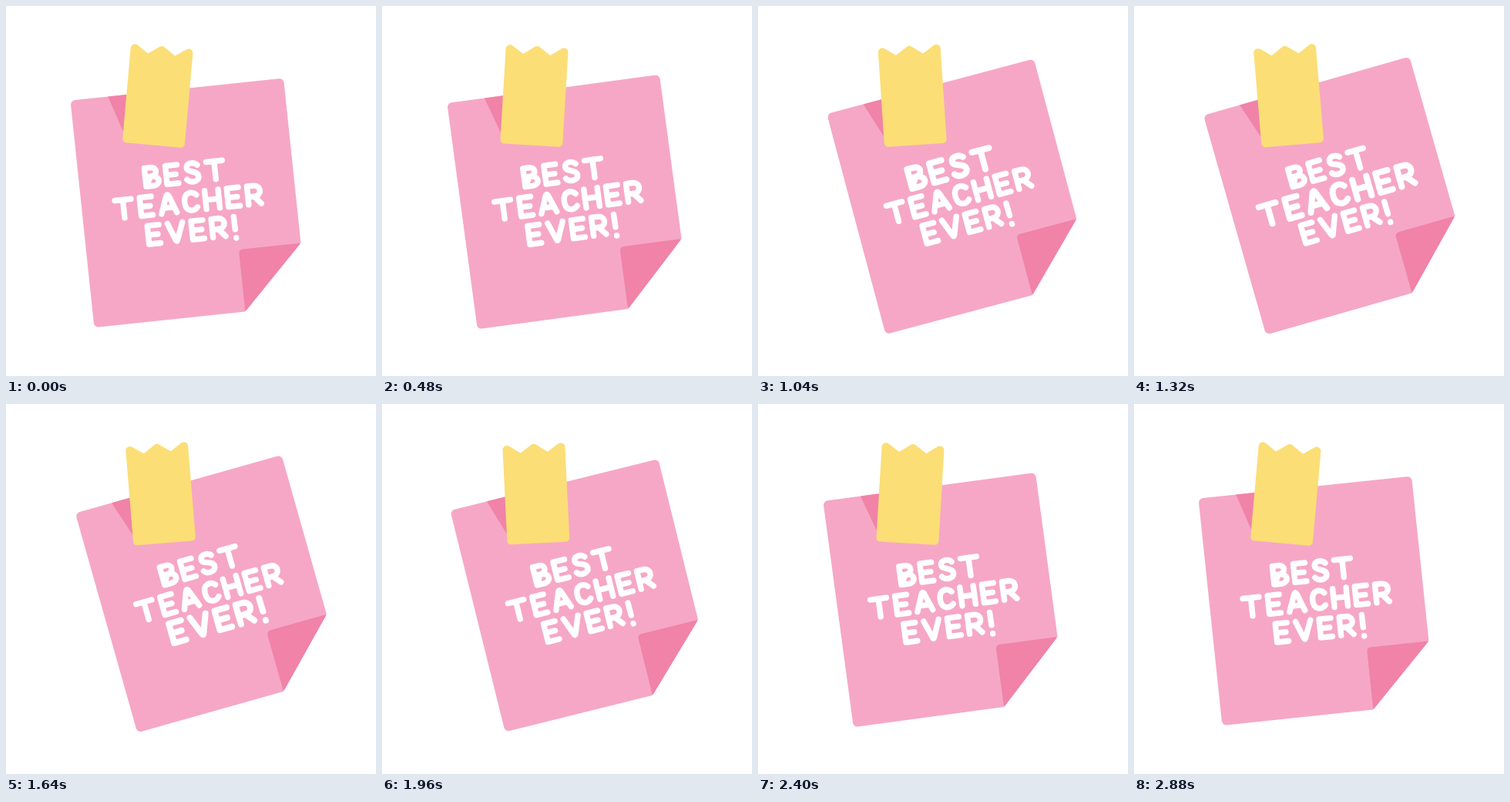
Animation of 480 by 480 pixels, one loop 2920 ms. Source, as an HTML page with a canvas:

```html
<!DOCTYPE html>
<html lang="en">
<head>
<meta charset="utf-8">
<title>Best teacher ever!</title>
<style>
html, body { margin: 0; width: 100%; height: 100%; overflow: hidden; background: #fff; }
canvas { display: block; width: 480px; height: 480px; }
</style>
</head>
<body>
<canvas id="stage" width="480" height="480" role="img" aria-label="BEST TEACHER EVER!"></canvas>
<script>
const ctx = document.getElementById('stage').getContext('2d');

const LOOP = 2920, STEP = 40, SWING = 2880;
const PIVOT = [197.3, 94.8];
const RAD = Math.PI / 180;
const PINK = '#f6a7c6', ROSE = '#f083a7', YELLOW = '#fbde76';
const W = 278, H = 296, FOLD = 81;
const GAP = 11.3, LEADING = 37.4, CAP = 24;
const LINES = ['BEST', 'TEACHER', 'EVER!'];

// Hand lettering: width and stroked path of each letter
const glyph = (width, path) => ({ width, path: new Path2D(path) });
const GLYPHS = {
  A: glyph(20, 'M0 24L8.4 1.6Q10 -1.4 11.6 1.6L20 24M4 16.8H16'),
  B: glyph(16, 'M0 24V0H8C17 0 17 11 7 11.5H2M7 11.5C20 11 20 24 9 24H0Z'),
  C: glyph(16, 'M16 4C11 -2 0 -1 0 12C0 25 11 26 16 20'),
  E: glyph(15, 'M15 0H0V24H15M0 12H12.5'),
  H: glyph(17.5, 'M0 0V24M17.5 0V24M0 12H17.5'),
  R: glyph(16.5, 'M0 24V0H8C19 0 19 14 8 14H2M8 14L16.5 24'),
  S: glyph(15.5, 'M15 3C12 -1 1 -2 1 5.5C1 12 15.5 10 15.5 18C15.5 25 4 26 0 20.5'),
  T: glyph(21, 'M0 .5H21M10.5 .5V24'),
  V: glyph(19.5, 'M0 0L9 23Q9.8 24.6 10.6 23L19.5 0'),
  '!': glyph(3, 'M1.5 0L1.8 16.5M2 27.5V27.8')
};

// Cubic ease (.6, 0, .4, 1), solved by bisection
function ease(x) {
  let lo = 0, hi = 1, s = .5;
  for (let i = 0; i < 24; i++) {
    s = (lo + hi) / 2;
    if (1.8 * s - 2.4 * s * s + 1.6 * s * s * s < x) lo = s; else hi = s;
  }
  return s * s * (3 - 2 * s);
}

function pulse(t, peak) {
  const d = Math.min(1, Math.abs(t - peak) / 280);
  return 1 + .04 * (1 + Math.cos(Math.PI * d));
}

// Runs paint in a frame moved to (x, y) and turned by deg
function at(x, y, deg, paint) {
  ctx.save();
  ctx.translate(x, y);
  ctx.rotate(deg * RAD);
  paint();
  ctx.restore();
}

// Filled polygon of [x, y, radius] corners
function shape(points, color) {
  const a = points[points.length - 1], b = points[0];
  ctx.beginPath();
  ctx.moveTo((a[0] + b[0]) / 2, (a[1] + b[1]) / 2);
  points.forEach(([x, y, r = 0], i) => {
    const next = points[(i + 1) % points.length];
    ctx.arcTo(x, y, next[0], next[1], r);
  });
  ctx.closePath();
  ctx.fillStyle = color;
  ctx.fill();
}

// One line of lettering, centred, popping in its turn
function drawLine(text, i, t) {
  const letters = [...text].map(ch => GLYPHS[ch]);
  const width = letters.reduce((sum, g) => sum + g.width + GAP, -GAP);
  const k = pulse(t, 1040 + 300 * i);
  at(136.9 + 1.2 * i, 109.2 + LEADING * i, 0, () => {
    ctx.scale(k, k);
    ctx.translate(-width / 2, -CAP / 2);
    for (const g of letters) {
      ctx.stroke(g.path);
      ctx.translate(g.width + GAP, 0);
    }
  });
}

function drawNote(t) {
  const x = W - FOLD, y = H - FOLD;
  shape([[0, 0, 6], [W, 0, 6], [W, y, 1], [x, H, 1], [0, H, 6]], PINK);
  shape([[x, y, 5], [W, y, 1], [x, H, 1]], ROSE);
  shape([[49, 0], [100, 0], [85, 50], [65, 50.5]], ROSE);
  ctx.strokeStyle = '#fff';
  ctx.lineWidth = 7.4;
  ctx.lineCap = ctx.lineJoin = 'round';
  LINES.forEach((text, i) => drawLine(text, i, t));
}

function drawTape() {
  const w = 81, h = 131.4, mid = w / 2, notch = 17.6;
  shape([
    [0, -2, 5.5], [mid - notch, 13.6, 1], [mid, 1.5, 5], [mid + notch, 13.6, 1],
    [w, -2, 5.5], [w, h, 5], [0, h, 5]
  ], YELLOW);
}

function draw(t) {
  const u = t / (SWING / 2);
  const angle = -10 * ease(u < 1 ? u : 2 - u);
  ctx.fillStyle = '#fff';
  ctx.fillRect(0, 0, 480, 480);
  at(...PIVOT, angle, () => {
    ctx.translate(-PIVOT[0], -PIVOT[1]);
    at(83.5, 122.7, -6, () => drawNote(t));
    at(162.5, 46, 5.1, drawTape);
  });
}

function tick() {
  draw(Math.floor(performance.now() % LOOP / STEP) * STEP);
  requestAnimationFrame(tick);
}
tick();
</script>
</body>
</html>
```
